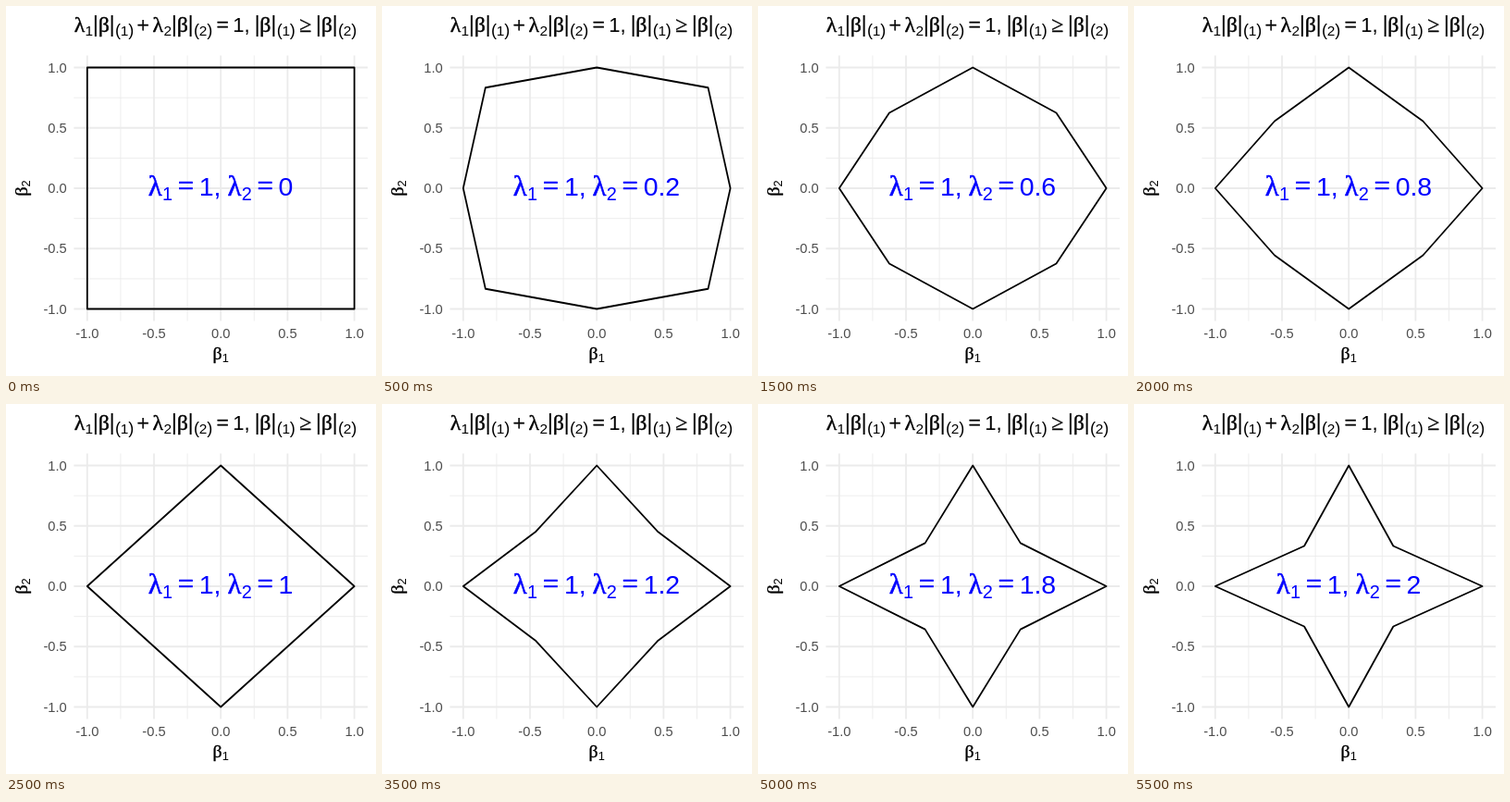
Write an HTML page with a canvas that moves like this. It is 400 by 400 pixels and loops after 6 s.

```html
<!DOCTYPE html>
<html lang="en">
<head>
<meta charset="utf-8">
<title>Penalty ball</title>
<style>
  html, body { margin: 0; width: 100%; height: 100%; overflow: hidden; background: #fff; }
  canvas { display: block; width: 400px; height: 400px; }
</style>
</head>
<body>
<canvas id="stage"></canvas>
<script>
const canvas = document.getElementById('stage');
const ratio = window.devicePixelRatio || 1;
canvas.width = canvas.height = 400 * ratio;
const ctx = canvas.getContext('2d');
ctx.scale(ratio, ratio);
ctx.lineJoin = 'round';

const SANS = '"Liberation Sans", Arial, sans-serif';
const SERIF = '"Liberation Serif", "Times New Roman", serif';
const SYMBOL_SIZE = 1.08, SYMBOL_WEIGHT = 0.02;
const STEP = 500, LOOP = 6000;
const px = x => 232.2 + x * 144.4;
const py = y => 197 - y * 130.5;

// Splits a formula into placed glyphs; "_1" and "_(1)" are subscripts. Lengths are in em.
function layout(formula) {
  const glyphs = [];
  let x = 0;
  const put = (text, font, advance, size = 1, dy = 0, before = 0, after = before) => {
    x += before;
    glyphs.push({ text, font, size, dy, x: x + advance / 2 });
    x += advance + after;
  };
  const symbol = (text, gap = 0) => put(text, SERIF, 0.549, SYMBOL_SIZE, 0, gap);
  for (const token of formula.match(/_\(\d\)|_\d|./g)) {
    if (token[0] === '_') {
      if (token.length > 2) x += 0.03;
      for (const c of token.slice(1)) {
        if (c === '(' || c === ')') put(c, SANS, 0.257, 0.82, 0.16);
        else put(c, SANS, 0.389, 0.7, 0.16);
      }
    }
    else if ('λβ'.includes(token)) symbol(token);
    else if ('=≥'.includes(token)) symbol(token, 0.231);
    else if (token === '+') symbol(token, 0.185);
    else if (token === '|') put(token, SANS, 0.26, 1.09);
    else if (token === ',') put(token, SANS, 0.278, 1, 0, 0, 0.231);
    else put(token, SANS, token === '.' ? 0.278 : 0.556);
  }
  return { glyphs, width: x };
}

function drawFormula(formula, x, y, size, color, centered = true) {
  const { glyphs, width } = layout(formula);
  const left = centered ? x - width * size / 2 : x;
  ctx.fillStyle = ctx.strokeStyle = color;
  ctx.lineWidth = SYMBOL_WEIGHT * size;
  ctx.textAlign = 'center';
  for (const g of glyphs) {
    const place = [g.text, left + g.x * size, y + g.dy * size];
    ctx.font = `${g.size * size}px ${g.font}`;
    ctx.fillText(...place);
    if (g.font === SERIF) ctx.strokeText(...place);
  }
}

function drawGrid(values, width) {
  ctx.strokeStyle = '#ebebeb';
  ctx.lineWidth = width;
  ctx.beginPath();
  for (const v of values) {
    ctx.moveTo(px(v), py(1.1));
    ctx.lineTo(px(v), py(-1.1));
    ctx.moveTo(px(-1.1), py(v));
    ctx.lineTo(px(1.1), py(v));
  }
  ctx.stroke();
}

function drawAxes() {
  const ticks = [-1, -0.5, 0, 0.5, 1];
  drawGrid([-0.75, -0.25, 0.25, 0.75], 0.89);
  drawGrid(ticks, 1.78);
  ctx.fillStyle = '#4d4d4d';
  ctx.font = `14.67px ${SANS}`;
  for (const v of ticks) {
    ctx.textAlign = 'center';
    ctx.fillText(v.toFixed(1), px(v), 359.3);
    ctx.textAlign = 'right';
    ctx.fillText(v.toFixed(1), 65.7, py(v) + 5.2);
  }
  drawFormula('β_1', px(0), 381.9, 18.33, '#000');
  ctx.save();
  ctx.translate(23, py(0));
  ctx.rotate(-Math.PI / 2);
  drawFormula('β_2', 0, 0, 18.33, '#000');
  ctx.restore();
  drawFormula('λ_1|β|_(1)+λ_2|β|_(2)=1,|β|_(1)≥|β|_(2)', 73.4, 28.4, 22, '#000', false);
}

function drawBall(lambda2) {
  const c = 1 / (1 + lambda2);
  const points = [[1, 0], [c, c], [0, 1], [-c, c], [-1, 0], [-c, -c], [0, -1], [c, -c]];
  ctx.strokeStyle = '#000';
  ctx.lineWidth = 1.78;
  ctx.beginPath();
  for (const [x, y] of points) ctx.lineTo(px(x), py(y));
  ctx.closePath();
  ctx.stroke();
}

function render(now) {
  const slot = Math.floor(now % LOOP / STEP);
  const step = slot > 5 ? slot - 1 : slot; // the diamond holds for two slots
  const lambda2 = step / 5;
  ctx.fillStyle = '#fff';
  ctx.fillRect(0, 0, 400, 400);
  drawAxes();
  drawBall(lambda2);
  drawFormula(`λ_1=1,λ_2=${lambda2}`, px(0) - 0.4, 205.4, 28.45, '#00f');
}

const start = performance.now();
function tick() {
  render(performance.now() - start);
  requestAnimationFrame(tick);
}
tick();
</script>
</body>
</html>
```
